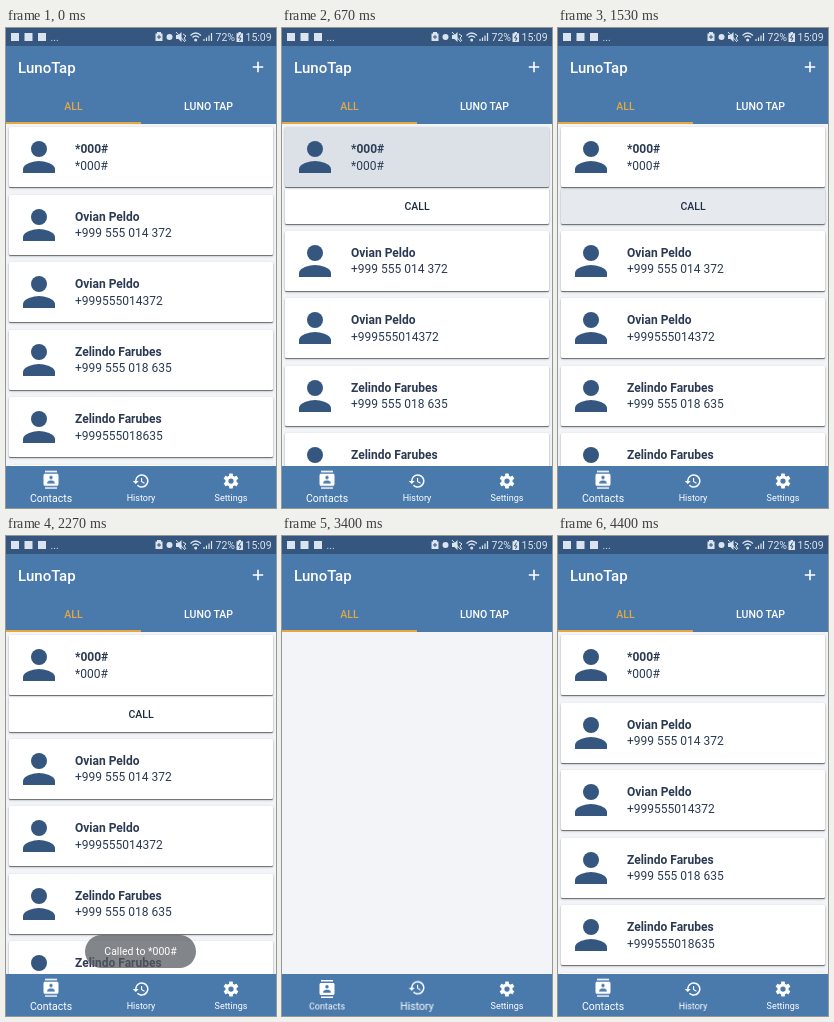
Animation, 270 px wide and 480 px high, one loop 5870 ms. Source, as an HTML page:

```html
<!DOCTYPE html>
<html lang="en">
<head>
<meta charset="utf-8">
<title>Contacts</title>
<style>
  html, body { margin: 0; width: 100%; height: 100%; overflow: hidden; }
  :root { --blue: #4a7aac; --ink: #35577f; --page: #f2f4f8; --loop: 5870ms linear infinite; }
  #stage {
    position: relative; width: 270px; height: 480px; overflow: hidden;
    background: var(--page); font: 12px/16.4px Roboto, sans-serif; color: #2b3a52;
  }
  #stage div, #stage > svg { position: absolute; }
  .mid { text-align: center; white-space: nowrap; }

  .status { width: 270px; height: 18px; background: var(--ink); }
  .header { top: 18px; width: 270px; height: 78px; background: var(--blue); color: #fff; }
  .title { left: 12px; top: 12px; font: 500 15px/20px Roboto, sans-serif; }
  .tab { top: 53px; width: 135px; font: 500 10.5px/15px Roboto, sans-serif; }
  .tab.on { color: #e3a840; }
  .underline { top: 76px; width: 135px; height: 2px; background: #e3a840; }

  .list { top: 96px; width: 270px; height: 342px; overflow: hidden; animation: list var(--loop); }
  .card {
    left: 3px; width: 264px; height: 60px; border-radius: 1.5px; background: #fff;
    box-shadow: 0 1px 1px rgba(0,0,0,.5), 0 1px 3px rgba(0,0,0,.2);
  }
  .card svg { position: absolute; left: 6px; top: 6px; fill: var(--ink); }
  .text { left: 66px; top: 14.3px; white-space: nowrap; }
  .first { top: 3px; z-index: 1; }
  .rest { top: 0; z-index: 1; width: 270px; animation: push var(--loop); }
  .panel { top: 64px; height: 36px; animation: panel var(--loop); }
  .call { width: 264px; top: 11px; font: 500 10.5px/15px Roboto, sans-serif; color: #1f2a3f; }

  .press { inset: 0; overflow: hidden; border-radius: 1.5px; }
  .tint { inset: 0; background: #345073; opacity: 0; }
  .ripple { width: 118px; height: 118px; border-radius: 50%; background: #345073; opacity: 0; }
  .first .tint { animation: rowTint var(--loop); }
  .first .ripple { left: 128.5px; top: -24px; animation: rowRipple var(--loop); }
  .panel .tint { animation: callTint var(--loop); }
  .panel .ripple { width: 102px; height: 102px; left: 101px; top: -38px; animation: callRipple var(--loop); }

  .toast {
    left: 79px; top: 399px; width: 111px; height: 33px; border-radius: 17px;
    background: rgba(85,90,95,.92); color: #fff; font-size: 10.5px; line-height: 33px;
    animation: toast var(--loop);
  }

  .bar { top: 438px; width: 270px; height: 42px; background: var(--blue); color: #fff; font-size: 9px; line-height: 14px; }
  .item { width: 90px; height: 42px; }
  .item svg { position: absolute; left: 36px; top: 6px; fill: #fff; }
  .item .label { top: 24.5px; width: 90px; }
  .contacts svg { animation: leave var(--loop); --on: translateY(-1.3px); }
  .contacts .label { animation: leave var(--loop); --on: scale(1.1667); }
  .history svg { animation: enter var(--loop); --on: translateY(-1.3px); }
  .history .label { animation: enter var(--loop); --on: scale(1.1667); }

  @keyframes rowTint {
    0%, 1.19% { opacity: 0 } 5.62% { opacity: .42 } 7.5% { opacity: .45 }
    11.41% { opacity: .17 } 14.48%, 100% { opacity: 0 }
  }
  @keyframes rowRipple {
    0%, 1.18% { transform: scale(0); opacity: 0 } 1.19% { transform: scale(.1); opacity: .36 }
    5.62% { transform: scale(1); opacity: .36 } 7.5% { transform: scale(1.7); opacity: .25 }
    10.22%, 100% { transform: scale(3.2); opacity: 0 }
  }
  @keyframes push {
    0%, 4.6% { transform: none; animation-timing-function: ease }
    8.52%, 49.9% { transform: translateY(36px) } 50%, 100% { transform: none }
  }
  @keyframes panel {
    0%, 4.59% { opacity: 0 } 4.6%, 49.9% { opacity: 1 } 50%, 100% { opacity: 0 }
  }
  @keyframes callTint {
    0%, 16.18% { opacity: 0 } 20.44% { opacity: .49 } 22.5% { opacity: .49 } 27.26%, 100% { opacity: 0 }
  }
  @keyframes callRipple {
    0%, 16.17% { transform: scale(0); opacity: 0 } 16.18% { transform: scale(.1); opacity: .19 }
    20.44% { transform: scale(1); opacity: .19 } 23.85% { transform: scale(2.2); opacity: .15 }
    26%, 100% { transform: scale(3.2); opacity: 0 }
  }
  @keyframes toast {
    0%, 28.45% { opacity: 0 } 30.66%, 35.26% { opacity: 1 } 38.67% { opacity: .8 } 40.88%, 100% { opacity: 0 }
  }
  @keyframes list {
    0%, 40.88% { opacity: 1 } 40.89%, 70.36% { opacity: 0 } 73.8%, 100% { opacity: 1 }
  }
  @keyframes leave {
    0%, 40.89% { transform: var(--on) } 44.29%, 59.1% { transform: none } 62.5%, 100% { transform: var(--on) }
  }
  @keyframes enter {
    0%, 40.89% { transform: none } 44.29%, 59.1% { transform: var(--on) } 62.5%, 100% { transform: none }
  }
</style>
</head>
<body>
<div id="stage">
  <div class="status"></div>
  <svg width="270" height="18" fill="#dbe4ee" font-family="Roboto, sans-serif" font-size="10.5">
    <path d="M5 5h8v8H5zM18.500 5h8v8h-8zM32 5h8v8h-8z"/>
    <text x="44.500" y="13">...</text>
    <path d="M151 4h4v1.500h1.500V13h-7V5.500h1.500z"/>
    <path d="M153 7v4M151 9h4" stroke="#35577f"/>
    <circle cx="163.500" cy="9" r="3"/>
    <path d="M170 7h2.500l3-3v10l-3-3H170z"/>
    <path d="M177 6l3 2-2 2 2 3M170 4l9 10" fill="none" stroke="#dbe4ee"/>
    <g fill="none" stroke="#dbe4ee" stroke-width="1.200">
      <path d="M184.500 7.500q5-5 10.500 0M186.500 9.500q3-3 6.500 0"/>
      <path d="M198 13v-2M200.500 13V9.500M203 13V7.500M205.500 13V5"/>
    </g>
    <circle cx="189.700" cy="12" r="1.500"/>
    <text x="209.500" y="13">72%</text>
    <path d="M232.500 4h2.500v1.200h2V14h-6.500V5.200h2z"/>
    <path d="M234.500 6.500l-2 3.500h2.500l-1.500 3" fill="none" stroke="#35577f"/>
    <text x="239.500" y="13">15:09</text>
  </svg>

  <div class="header">
    <div class="title">LunoTap</div>
    <div class="tab mid on">ALL</div>
    <div class="tab mid" style="left:135px">LUNO TAP</div>
    <div class="underline"></div>
  </div>
  <svg width="12" height="12" style="left:246px;top:33px" stroke="#fff" stroke-width="1.600"><path d="M6 .8v10.400M.8 6h10.400"/></svg>

  <div class="list">
    <div class="card panel">
      <div class="call mid">CALL</div>
      <div class="press"><div class="tint"></div><div class="ripple"></div></div>
    </div>
    <div class="card first">
      <div class="press" style="z-index:1"><div class="tint"></div><div class="ripple"></div></div>
    </div>
    <div class="rest"></div>
  </div>

  <div class="toast mid">Called to *000#</div>

  <div class="bar">
    <div class="item contacts">
      <svg width="18" height="18" viewBox="0 0 24 24"><path d="M20 0H4v2h16V0zM4 24h16v-2H4v2zM20 4H4c-1.100 0-2 .9-2 2v12c0 1.100.9 2 2 2h16c1.100 0 2-.9 2-2V6c0-1.100-.9-2-2-2z"/><g fill="#4a7aac"><circle cx="12" cy="9" r="2.250"/><path d="M17 17H7v-1.500c0-1.670 3.330-2.500 5-2.500s5 .83 5 2.500z"/></g></svg>
      <div class="label mid">Contacts</div>
    </div>
    <div class="item history" style="left:90px">
      <svg width="18" height="18" viewBox="0 0 24 24"><path d="M13 3a9 9 0 0 0-9 9H1l4 4 4-4H6a7 7 0 1 1 2.060 4.940l-1.420 1.420A9 9 0 1 0 13 3zM12 8v5l4.280 2.540.72-1.210-3.500-2.080V8z"/></svg>
      <div class="label mid">History</div>
    </div>
    <div class="item" style="left:180px">
      <svg width="18" height="18" viewBox="0 0 24 24">
        <g id="teeth"></g>
        <circle cx="12" cy="12" r="7.500"/><circle cx="12" cy="12" r="3.500" fill="#4a7aac"/>
      </svg>
      <div class="label mid">Settings</div>
    </div>
  </div>
</div>
<script>
  const contacts = [
    ['*000#', '*000#'],
    ['Ovian Peldo', '+999 555 014 372'],
    ['Ovian Peldo', '+999555014372'],
    ['Zelindo Farubes', '+999 555 018 635'],
    ['Zelindo Farubes', '+999555018635'],
    ['Zelindo Farubes', '+999555018635']
  ];
  const person = '<svg width="48" height="48" viewBox="0 0 24 24"><circle cx="12" cy="8" r="4"/>' +
    '<path d="M12 14c-2.670 0-8 1.340-8 4v2h16v-2c0-2.660-5.330-4-8-4z"/></svg>';
  const row = ([name, number]) => `${person}<div class="text"><b>${name}</b><br>${number}</div>`;

  document.querySelector('.first').insertAdjacentHTML('afterbegin', row(contacts[0]));
  document.querySelector('.rest').innerHTML = contacts.slice(1)
    .map((contact, i) => `<div class="card" style="top:${70.5 + i * 67.5}px">${row(contact)}</div>`).join('');
  document.querySelector('#teeth').innerHTML = [0, 60, 120]
    .map(angle => `<rect x="9.500" y="2" width="5" height="20" rx=".6" transform="rotate(${angle} 12 12)"/>`).join('');
</script>
</body>
</html>
```
